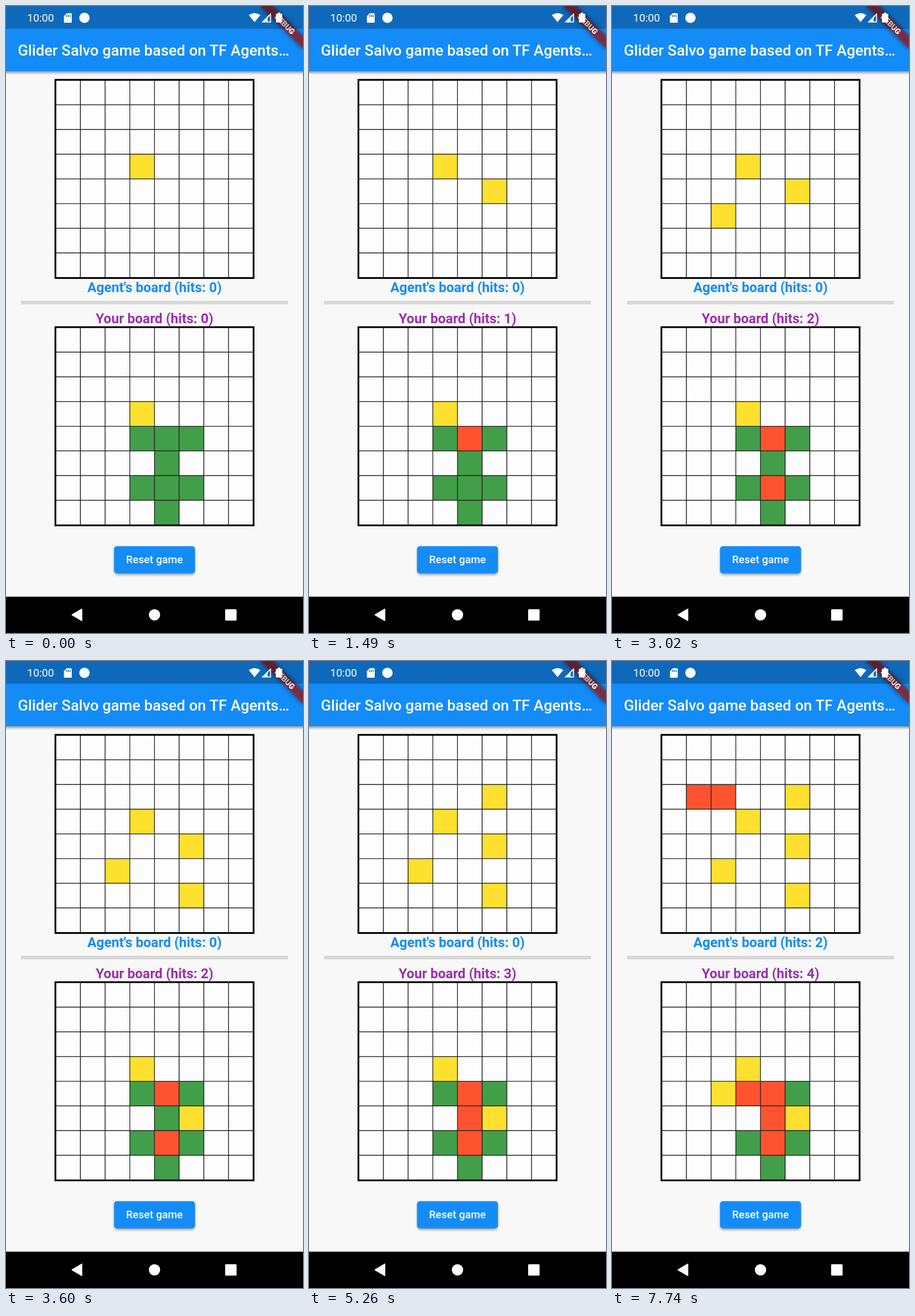
Animation of 515 by 1087 pixels, one loop 8000 ms. Source, as an HTML page:

```html
<!DOCTYPE html>
<html lang="en">
<head>
<meta charset="utf-8">
<title>Board game</title>
<style>
  html, body { margin: 0; height: 100%; overflow: hidden; background: #f8f8f8; }
  svg { display: block; width: 100vw; height: 100vh; font-family: Roboto, sans-serif; }
  .label { font-size: 23.6px; font-weight: 700; text-anchor: middle; }
  .medium { font-weight: 500; fill: #fff; }
</style>
</head>
<body>
<svg viewBox="0 0 515 1087">
  <defs>
    <filter id="blur" x="-30%" y="-100%" width="160%" height="300%"><feGaussianBlur stdDeviation="4.5"/></filter>
    <filter id="soft" x="-10%" y="-30%" width="120%" height="160%"><feGaussianBlur stdDeviation="2"/></filter>
  </defs>
  <rect width="515" height="1087" fill="#f8f8f8"/>

  <!-- App bar -->
  <rect x="-10" y="60" width="535" height="56" opacity=".4" filter="url(#soft)"/>
  <rect width="515" height="113" fill="#148cf8"/>
  <text class="medium" x="20.5" y="86" font-size="26.2">Glider Salvo game based on TF Agents…</text>

  <!-- Corner banner -->
  <g transform="translate(515 0) rotate(45)">
    <rect x="-52.5" y="36.7" width="105" height="15.8" opacity=".5" filter="url(#blur)"/>
    <rect x="-52.5" y="36.7" width="105" height="15.8" fill="#b71c1c" opacity=".63"/>
    <text y="49.3" font-size="13.4" font-weight="900" fill="#fff" text-anchor="middle">DEBUG</text>
  </g>

  <!-- Status bar -->
  <rect width="515" height="39.5" opacity=".25"/>
  <g fill="#fff">
    <text x="36.8" y="27.4" font-size="18.6">10:00</text>
    <path d="M105.500 12.500H112.500Q114 12.500 114 14V27.500Q114 29 112.500 29H102Q100.500 29 100.500 27.500V17.500Z"/>
    <path d="M105.200 15.500v3.500M108.200 15.500v3.500M111.200 15.500v3.500" stroke="#0f69ba" stroke-width="1.500"/>
    <circle cx="136" cy="20.500" r="9"/>
    <path d="M431 28L421 15.800Q431 8.500 441 15.800Z"/>
    <path d="M459.500 12V28.500H443Z"/>
    <path d="M457.800 16.500V26.800H453.500V20.800Z" fill="#0f69ba"/>
    <path d="M471.500 11.500h4v2h2.500q1 0 1 1v13q0 1-1 1h-9q-1 0-1-1v-13q0-1 1-1h2.500z"/>
  </g>

  <g id="boards"></g>
  <text class="label" x="257.500" y="496" fill="#158cf3"></text>
  <rect x="26" y="511" width="463" height="6.300" fill="#d8d9d6"/>
  <text class="label" x="257.500" y="549.700" fill="#9c2fae"></text>

  <!-- Button -->
  <rect x="188" y="939" width="139" height="47" rx="5" opacity=".4" filter="url(#soft)"/>
  <rect x="187.300" y="936.500" width="140.500" height="47" rx="5" fill="#148cf8"/>
  <text class="medium" x="257.500" y="966.300" font-size="18.360" letter-spacing=".1" text-anchor="middle">Reset game</text>

  <!-- Navigation bar -->
  <rect y="1024" width="515" height="63"/>
  <g fill="#fff">
    <path d="M114.500 1055.500L131.500 1045.500V1065.500Z" stroke="#fff" stroke-width="1.500" stroke-linejoin="round"/>
    <circle cx="257.500" cy="1055.500" r="9.800"/>
    <rect x="380" y="1045.700" width="19.800" height="19.800" rx="1.500"/>
  </g>
</svg>
<script>
const LOOP = 8000;
const TURNS = [0, 500, 2150, 3600, 5260, 6500, 7740];
const SIZE = 42.8, LEFT = 86.3;
const EMPTY = '#fdfdfd', MISS = '#fee02f', HIT = '#ff5330', SHIP = '#429e49';

// Cells are written as "row column"; each turn adds one shot per board.
const boards = [
  { name: "Agent's", top: 128.6, ship: ['21', '22'], shots: ['33', '45', '52', '65', '25', '22', '21'] },
  { name: 'Your', top: 557.4, visible: true,
    ship: ['43', '44', '45', '54', '63', '64', '65', '74'],
    shots: ['33', '44', '64', '55', '54', '42', '43'] }
];

function addRect(x, y, size, fill, stroke, width) {
  const rect = document.createElementNS('http://www.w3.org/2000/svg', 'rect');
  const attrs = { x, y, width: size, height: size, fill, stroke, 'stroke-width': width };
  for (const key in attrs) rect.setAttribute(key, attrs[key]);
  document.getElementById('boards').append(rect);
  return rect;
}

const labels = document.querySelectorAll('.label');
boards.forEach((board, i) => {
  board.label = labels[i];
  board.cells = {};
  for (let row = 0; row < 8; row++)
    for (let col = 0; col < 8; col++)
      board.cells[`${row}${col}`] = addRect(LEFT + col * SIZE, board.top + row * SIZE, SIZE, EMPTY, '#222', 1.2);
  addRect(LEFT - 0.6, board.top - 0.6, SIZE * 8 + 1.2, 'none', '#000', 3);
});

function draw(board, turn) {
  const shots = board.shots.slice(0, turn);
  for (const key in board.cells) {
    const onShip = board.ship.includes(key);
    const color = shots.includes(key) ? (onShip ? HIT : MISS)
      : onShip && board.visible ? SHIP : EMPTY;
    board.cells[key].setAttribute('fill', color);
  }
  const hits = shots.filter(key => board.ship.includes(key)).length;
  board.label.textContent = `${board.name} board (hits: ${hits})`;
}

let shown = 0;
function tick() {
  const time = performance.now() % LOOP;
  const turn = TURNS.filter(start => start <= time).length;
  if (turn !== shown) boards.forEach(board => draw(board, turn));
  shown = turn;
  requestAnimationFrame(tick);
}
tick();
</script>
</body>
</html>
```
